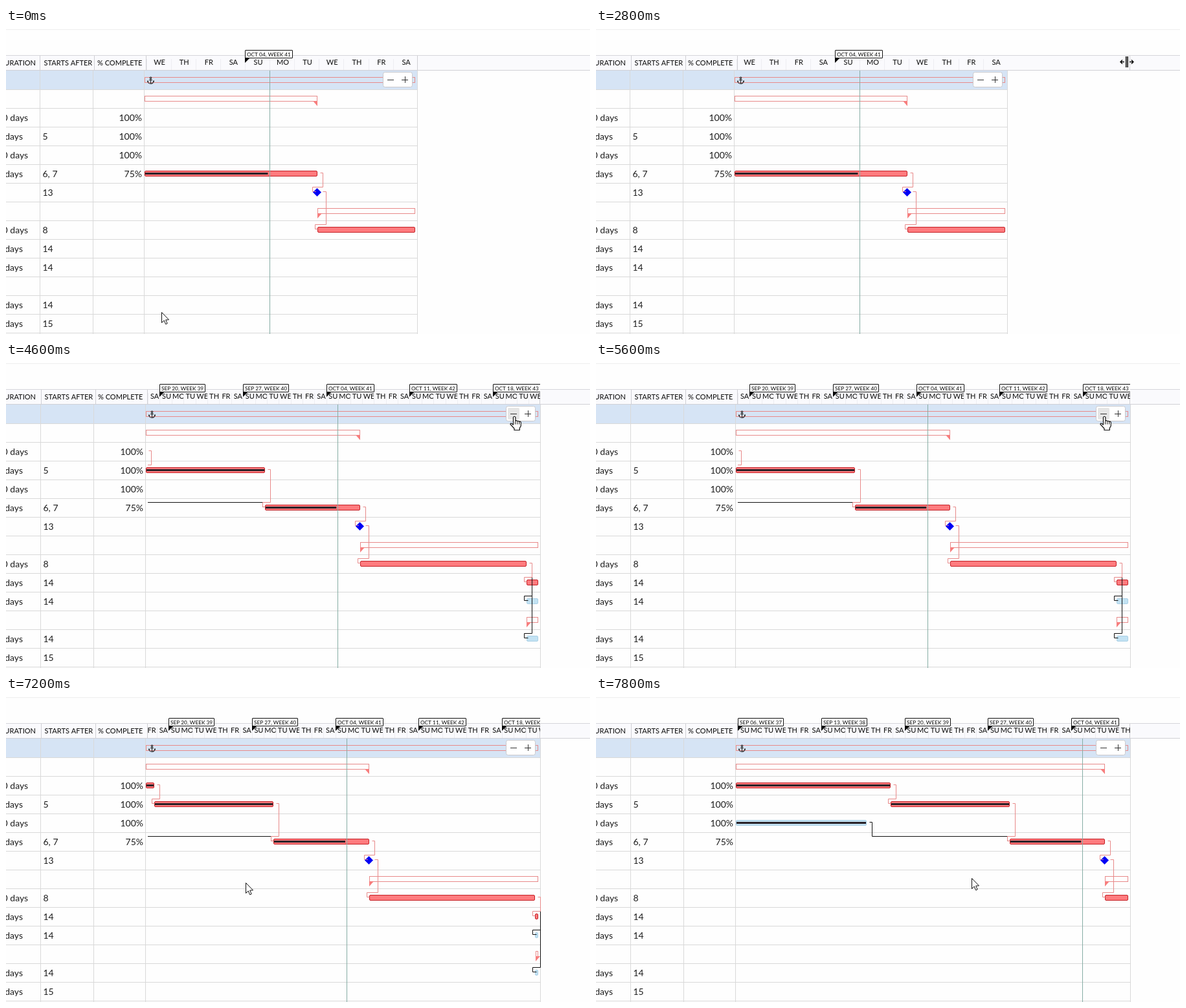
Write an HTML page with a canvas that moves like this. It is 902 px wide and 474 px high and loops after 8 s.

```html
<!DOCTYPE html>
<html lang="en">
<head>
<meta charset="utf-8">
<title>Gantt chart</title>
<style>
  html, body { margin: 0; width: 100%; height: 100%; overflow: hidden; background: #fefefe; }
  canvas { display: block; }
</style>
</head>
<body>
<canvas id="stage" width="902" height="474"></canvas>
<script>
const ctx = document.getElementById('stage').getContext('2d');
const W = 902, H = 474, LOOP = 8000, STEP = 200;
const ROW = 29, TOP = 66;
const PINK = '#e88a8a', DARK = '#2a2228', INK = '#1c1c1c', GRID = '#d9d9d9';
const DAYS = ['SU', 'MO', 'TU', 'WE', 'TH', 'FR', 'SA'];
const FAR = 99;

// Cells: row, duration, predecessors, percent
const CELLS = [
  [2, '10 days', '', '100%'], [3, '8 days', '5', '100%'], [4, '10 days', '', '100%'],
  [5, '6 days', '6, 7', '75%'], [6, '', '13', ''], [8, '10 days', '8', ''],
  [9, '5 days', '14', ''], [10, '5 days', '14', ''], [12, '5 days', '14', ''], [13, '5 days', '15', '']
];

// Days are counted from Sunday, October 4
const SUMMARIES = [
  { row: 0, from: -FAR, to: FAR },
  { row: 1, from: -FAR, to: 3 },
  { row: 7, from: 3, to: FAR },
  { row: 11, from: 17, to: FAR }
];
const BARS = [
  { row: 2, from: -FAR, to: -15.04, done: 1 },
  { row: 3, from: -15.04, to: -5.03, done: 1 },
  { row: 4, from: -FAR, to: -17.06, done: 1, blue: true },
  { row: 5, from: -5.03, to: 3, done: 0.75 },
  { row: 8, from: 3, to: 16.95, done: 0 },
  { row: 9, from: 16.95, to: FAR, done: 0 },
  { row: 10, from: 16.95, to: FAR, done: 0, blue: true },
  { row: 12, from: 16.95, to: FAR, done: 0, blue: true }
];

// Cursor path: time, x, y
const CURSOR = [
  [0, 240, 440], [200, 262, 420], [1000, 634, 56], [1400, 634, 56], [1600, 640, 58],
  [2600, 820, 52], [2800, 820, 52], [3000, 820, 54], [3600, 796, 92], [3800, 788, 86],
  [4000, 784, 84], [5600, 784, 84], [5800, 776, 92], [6000, 700, 130], [6600, 380, 280],
  [6800, 340, 290], [7000, 344, 290], [7200, 370, 289], [7800, 580, 282]
];
const PAN = [[0, 0], [7000, 0], [7200, 13.7], [7800, 239.2]];

function track(keys, t) {
  let i = 0;
  while (i < keys.length - 2 && t >= keys[i + 1][0]) i++;
  const a = keys[i], b = keys[i + 1];
  const k = Math.min(1, (t - a[0]) / (b[0] - a[0]));
  return a.slice(1).map((v, n) => v + (b[n + 1] - v) * k);
}

function viewAt(t) {
  if (t < 3000) return { x0: 216, x1: 635, left: 214, day: 38.1, zero: 369 };
  const wide = { x0: 219, x1: 825, left: 216 };
  if (t < 4600) return { ...wide, day: 55.1, zero: 439 };
  return { ...wide, day: 18.38, zero: 494.8 + track(PAN, t)[0] };
}

function box(x, y, w, h, color) {
  ctx.fillStyle = color;
  ctx.fillRect(x, y, w, h);
}
const hline = (x, y, w, color) => box(x, y, w, 1, color);
const vline = (x, y, h, color) => box(x, y, 1, h, color);

function poly(points, fill, stroke) {
  ctx.beginPath();
  points.forEach(([x, y]) => ctx.lineTo(x, y));
  ctx.closePath();
  if (fill) { ctx.fillStyle = fill; ctx.fill(); }
  if (stroke) { ctx.strokeStyle = stroke; ctx.lineWidth = 1; ctx.stroke(); }
}

function path(points, color) {
  ctx.beginPath();
  points.forEach(([x, y]) => ctx.lineTo(Math.round(x) + 0.5, Math.round(y) + 0.5));
  ctx.strokeStyle = color;
  ctx.lineWidth = 1;
  ctx.stroke();
}

function rounded(x, y, w, h, r, fill, stroke) {
  ctx.beginPath();
  ctx.roundRect(x + 0.5, y + 0.5, w - 1, h - 1, r);
  ctx.fillStyle = fill;
  ctx.fill();
  ctx.strokeStyle = stroke;
  ctx.lineWidth = 1;
  ctx.stroke();
}

function text(str, x, y, size, weight = 400, align = 'left', color = INK) {
  ctx.font = `${weight} ${size}px Lato, sans-serif`;
  ctx.textAlign = align;
  ctx.fillStyle = color;
  ctx.fillText(str, x, y);
}

function clipped(x, y, w, h, draw) {
  ctx.save();
  ctx.beginPath();
  ctx.rect(x, y, w, h);
  ctx.clip();
  draw();
  ctx.restore();
}

const midY = row => TOP + row * ROW + 14;

function drawTable(v, t) {
  const shift = v.x0 > 217 ? 1 : 0;
  box(0, 0, W, H, '#fefefe');
  hline(0, 2, W, '#eeeeee');
  box(0, 42, W, 24, '#fafafd');
  box(0, TOP, v.x1, ROW, '#d6e4f5');
  for (let r = 1; r <= 14; r++) hline(0, TOP + r * ROW, v.x1, GRID);
  [52 + shift, 134 + shift, v.left - 1, v.x1].forEach(x => vline(x, TOP, H - TOP, GRID));
  hline(0, 42, W, '#d6d6da');
  hline(0, 65, W, '#d0d0d6');

  const moved = t >= 1600;
  const edge = t < 1600 ? 635 : t < 3000 ? Math.round(track(CURSOR, t)[0]) + (t < 2000 ? 1 : 4) : v.x1 - 1;
  (moved ? [54, 138, 218] : [52, 136, 216]).forEach(x => vline(x, 43, 22, '#cfcfd4'));
  vline(edge, 43, 22, '#cfcfd4');
  text('DURATION', 46, 58, 11, 500, 'right');
  text('STARTS AFTER', moved ? 59.5 : 58.5, 58, 11, 500);
  text('% COMPLETE', moved ? 142 : 141, 58, 11, 500);

  for (const [row, span, after, done] of CELLS) {
    const y = midY(row) + 6;
    text(span, -13.5, y, 14);
    text(after, 56.5 + shift, y, 14);
    text(done, v.left - 4, y, 14, 400, 'right');
  }
}

function weekLabel(n) {
  const d = new Date(Date.UTC(2020, 9, 4 + n * 7));
  const month = ['SEP', 'OCT'][d.getUTCMonth() - 8] || 'AUG';
  return `${month} ${String(d.getUTCDate()).padStart(2, '0')}, WEEK ${41 + n}`;
}

function drawScale(v) {
  const first = Math.floor((v.x0 - v.zero) / v.day);
  const last = Math.ceil((v.x1 - v.zero) / v.day);
  clipped(v.x0, 30, v.x1 - v.x0, 36, () => {
    for (let d = first; d < last; d++) {
      const x = v.zero + d * v.day;
      vline(Math.round(x), 48, 17, '#ededf2');
      clipped(x, 43, v.day, 22, () =>
        text(DAYS[(d % 7 + 7) % 7], x + v.day / 2 + 1.4, 57, 11, 500, 'center'));
    }
    for (let n = Math.floor(first / 7); n * 7 < last; n++) {
      const x = Math.round(v.zero + n * 7 * v.day), label = weekLabel(n);
      ctx.font = '500 8.25px Lato, sans-serif';
      const w = Math.round(ctx.measureText(label).width) + 6;
      rounded(x, 34, w, 13, 0.5, '#fff', '#111');
      poly([[x, 46], [x + 8, 46], [x, 54]], '#000');
      text(label, x + 3, 43.6, 8.25, 500);
    }
  });
}

function drawLinks(v, at) {
  const end = at(3), a = at(-15.04), b = at(-5.03), c = at(16.95);
  // Elbow from the end of one row to the start of a later one
  const elbow = (x, r1, r2, color, out = 8, back = -4, lead = 4) => {
    const y1 = midY(r1) - 1, y2 = midY(r2) - 1;
    path([[x + lead, y1], [x + out, y1], [x + out, y2 - 7], [x + back, y2 - 7],
          [x + back, y2], [x + back + 4, y2]], color);
  };
  clipped(v.x0, TOP, v.x1 + 1 - v.x0, H - TOP, () => {
    const q = at(-17.06);
    path([[q + 4, 195], [q + 8, 195], [q + 8, 217], [b - 4, 217], [b - 4, 224]], '#111');
    for (const row of [10, 12]) {
      const y = midY(row) - 1;
      path([[c + 8, 333], [c + 8, y - 7], [c - 4, y - 7], [c - 4, y], [c + 2, y]], '#111');
    }
    elbow(a, 2, 3, PINK);
    elbow(b, 3, 5, PINK);
    elbow(end, 5, 6, PINK, 8, -8);
    elbow(end, 6, 8, PINK, 13, -4, 8);
    elbow(c, 8, 9, PINK);
  });
}

function drawAnchor(x, y) {
  ctx.strokeStyle = '#222';
  ctx.lineWidth = 1.1;
  ctx.beginPath();
  ctx.arc(x, y - 3.7, 1.3, 0, 7);
  ctx.moveTo(x, y - 2.4);
  ctx.lineTo(x, y + 5);
  ctx.moveTo(x - 2.5, y - 0.5);
  ctx.lineTo(x + 2.5, y - 0.5);
  ctx.moveTo(x + 5, y + 1);
  ctx.arc(x, y + 0.5, 4.8, 0.1, Math.PI - 0.1);
  ctx.stroke();
  poly([[x - 5.5, y + 2.5], [x - 4.8, y], [x - 2.8, y + 2]], '#222');
  poly([[x + 5.5, y + 2.5], [x + 4.8, y], [x + 2.8, y + 2]], '#222');
}

function drawChart(v) {
  const right = v.x1 - 3;
  const at = d => Math.round(v.zero - 2.8 + d * v.day);
  const clamp = x => Math.max(v.left, Math.min(right, x));

  for (const s of SUMMARIES) {
    const x = clamp(at(s.from)), e = clamp(at(s.to)), y = midY(s.row) - 4;
    if (e <= x) continue;
    if (s.row) box(x, y, e - x, 9, '#fefefe');
    ctx.strokeStyle = PINK;
    ctx.lineWidth = 1;
    ctx.strokeRect(x + 0.5, y + 0.5, e - x - 1, 8);
    if (s.to < FAR) poly([[e, y + 8], [e - 7, y + 8], [e, y + 16]], '#f77e7e');
    if (s.from > -FAR) poly([[x, y + 8], [x + 7, y + 8], [x, y + 16]], '#f77e7e');
  }
  drawAnchor(v.left + 9.5, 81);

  for (const b of BARS) {
    const x = clamp(at(b.from)), e = clamp(at(b.to)), y = midY(b.row) - 4;
    if (e <= x) continue;
    rounded(x, y, e - x, 9, 1.5, b.blue ? '#c3e2f3' : '#ff7b7e', b.blue ? '#a9d0e6' : '#c41e24');
    const stop = Math.min(e - 1, at(b.from) + (at(b.to) - at(b.from)) * b.done);
    if (b.done && stop > x) box(x + 1, y + 3, stop - x - 1, 3, DARK);
  }

  drawLinks(v, at);
  const m = at(3) - 0.5, y = midY(6) + 0.5;
  poly([[m, y - 6.5], [m + 6.5, y], [m, y + 6.5], [m - 6.5, y]], '#0000f5');
  hline(m - 4.5, y - 1.5, 3, '#d06a90');
  vline(at(1.08), TOP, H - TOP, '#86ada5');
}

function drawZoom(v, hover) {
  const x = v.x1 - 53;
  rounded(x, 68, 46, 24, 3, '#fff', '#c9c9cd');
  if (hover) {
    ctx.beginPath();
    ctx.roundRect(x + 3, 71, 18, 18, 2);
    ctx.fillStyle = '#e6e6e6';
    ctx.fill();
  }
  hline(x + 7, 80, 10, '#333');
  hline(x + 29, 80, 10, '#333');
  vline(x + 34, 75, 10, '#333');
}

function drawArrow(x, y) {
  poly([[0, 0], [0, 16], [3.7, 12.5], [6.2, 18.3], [8.7, 17.2], [6.2, 11.6], [11, 11.4]]
    .map(([a, b]) => [x + 0.5 + a, y + 0.5 + b]), '#fff', '#111');
}

function drawResize(x, y) {
  box(x - 2, y - 9, 5, 18, '#fff');
  box(x - 2, y - 8, 1.5, 17, '#000');
  box(x + 0.5, y - 8, 1.5, 17, '#000');
  for (const s of [-1, 1]) {
    ctx.beginPath();
    ctx.moveTo(x + s * 4, y + 0.5);
    ctx.lineTo(x + s * 10, y + 0.5);
    ctx.moveTo(x + s * 7, y - 2.5);
    ctx.lineTo(x + s * 10, y + 0.5);
    ctx.lineTo(x + s * 7, y + 3.5);
    ctx.strokeStyle = '#000';
    ctx.lineWidth = 1.3;
    ctx.stroke();
  }
}

function drawHand(x, y) {
  const at = (a, b) => [x + a + 0.5, y + b + 0.5];
  ctx.beginPath();
  ctx.moveTo(...at(-1, 13));
  ctx.lineTo(...at(-1, 1));
  ctx.quadraticCurveTo(...at(0.7, -1.5), ...at(2.4, 1));
  ctx.lineTo(...at(2.4, 7));
  for (const k of [0, 1, 2]) {
    const a = 2.4 + k * 2.8, b = 6.5 + k * 0.8;
    ctx.quadraticCurveTo(...at(a + 1.6, b - 1.4), ...at(a + 2.8, b + 0.8));
  }
  ctx.lineTo(...at(10.8, 14.5));
  ctx.lineTo(...at(8.8, 18));
  ctx.lineTo(...at(8.8, 21));
  ctx.lineTo(...at(0.5, 21));
  ctx.lineTo(...at(0.5, 18.5));
  ctx.lineTo(...at(-5.5, 12));
  ctx.quadraticCurveTo(...at(-5, 8.5), ...at(-1, 13));
  ctx.fillStyle = '#fff';
  ctx.fill();
  ctx.strokeStyle = '#111';
  ctx.lineWidth = 1.2;
  ctx.stroke();
  for (const a of [2.4, 5.2, 8]) path([at(a - 0.5, 7), at(a - 0.5, 11)], '#111');
}

function drawCursor(t) {
  const [x, y] = track(CURSOR, t).map(Math.round);
  if (t >= 1000 && t < 3000) drawResize(x, y);
  else if (t >= 4000 && t < 5800) drawHand(x, y);
  else drawArrow(x, y);
}

function draw(t) {
  const v = viewAt(t);
  drawTable(v, t);
  drawScale(v);
  drawChart(v);
  drawZoom(v, t >= 4000 && t < 5800);
  drawCursor(t);
}

function tick() {
  draw(Math.floor(performance.now() % LOOP / STEP) * STEP);
  requestAnimationFrame(tick);
}
tick();
</script>
</body>
</html>
```
